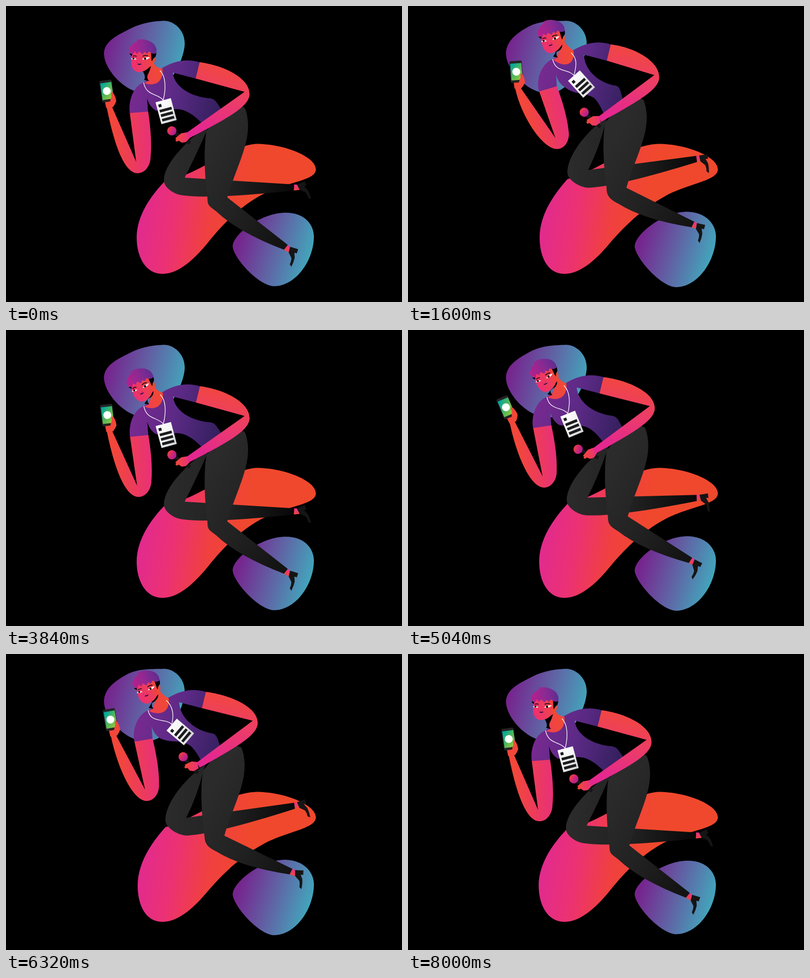
Animation of 800x600 px, one loop 8.04 s. Source, as an HTML page with a canvas:

```html
<!DOCTYPE html>
<html>
<head>
<meta charset="utf-8">
<title>Floating speaker</title>
<style>
html, body { margin: 0; width: 100%; height: 100%; overflow: hidden; background: #000; }
canvas { display: block; }
</style>
</head>
<body>
<canvas id="stage" width="800" height="600"></canvas>
<script>
const ctx = document.getElementById('stage').getContext('2d');
const LOOP = 8040;

// All motion mixes four waves: two eased lifts per loop, the drift that
// separates rising from sinking, and a slower sway and nod over the whole loop.
let phase, lift, drift, sway, nod;
function setTime(ms) {
  phase = ms % LOOP / LOOP * 4 * Math.PI;
  const u = (1 - Math.cos(phase)) / 2;
  lift = u * u * (3 - 2 * u);
  drift = Math.sin(phase) ** 3;
  sway = Math.sin(phase / 2);
  nod = (1 - Math.cos(phase / 2)) / 2;
}
const move = (rest, up, side = 0, slow = 0) => rest + up * lift + side * drift + slow * sway;

const add = (p, x, y) => [p[0] + x, p[1] + y];
const along = (p, v, k) => add(p, v[0] * k, v[1] * k);
function turned(origin, degrees) {
  const c = Math.cos(degrees * Math.PI / 180), s = Math.sin(degrees * Math.PI / 180);
  return (x, y) => add(origin, x * c - y * s, x * s + y * c);
}

function grad(from, to, ...colors) {
  const g = ctx.createLinearGradient(...from, ...to);
  colors.forEach((c, i) => g.addColorStop(i / (colors.length - 1), c));
  return g;
}
function fill(path, color) {
  ctx.fillStyle = color;
  ctx.fill(new Path2D(path));
}
function line(path, color, width) {
  ctx.strokeStyle = color;
  ctx.lineWidth = width;
  ctx.stroke(new Path2D(path));
}
function disc(x, y, r, color) {
  ctx.fillStyle = color;
  ctx.beginPath();
  ctx.arc(x, y, r, 0, 7);
  ctx.fill();
}
function placed(p, degrees, draw) {
  ctx.save();
  ctx.translate(...p);
  ctx.rotate(degrees * Math.PI / 180);
  draw();
  ctx.restore();
}

function blobs() {
  const k = lift, cool = ['#76258f', '#5f65a5', '#41a9bd'];
  fill(`M198 97C198 72 ${225 - 7 * k} ${59 - 3 * k} ${251 - 8 * k} ${46 - 4 * k}S300 31 318 30`
    + 'S361 46 361 76S330 176 285 177S198 127 198 97Z', grad([205, 85], [360, 125], ...cool));
  fill(`M${264 + 2 * k} 470C${264 + 2 * k} 425 292 385 322 ${354 - 3 * k}`
    + `C${385 - 5 * k} ${345 - 9 * k} ${455 - 13 * k} 282 505 279.5C560 279 626 305 626 331`
    + `C626 354 570 ${356 + 3 * k} 522 ${380 + 4 * k}C470 ${406 + 6 * k} 432 ${450 + 3 * k} 410 ${477 + k}`
    + `C386 507 352 543 316 543S${264 + 2 * k} 505 ${264 + 2 * k} 470Z`,
    grad([268, 410], [480, 445], '#e02a90', '#ec3174', '#f04040', '#f0482d'));
  fill(`M458 487C459 462 515 ${420 - 2 * k} 563 ${419 - 2 * k}C605 418 622 445 622 467`
    + `C622 515 586 ${568 + 2 * k} 541 ${568 + 2 * k}C508 ${566 + 2 * k} 458 508 458 487Z`,
    grad([470, 475], [615, 520], ...cool));
}

// Lower leg, sock and shoe hang from the inner knee corner.
function leg(thigh, knee, heel, angle, cap, bulge, color) {
  const len = Math.hypot(heel[0] - knee[0], heel[1] - knee[1]);
  const d = [(heel[0] - knee[0]) / len, (heel[1] - knee[1]) / len], n = [-d[1], d[0]];
  const top = along(heel, d, -6), low = along(top, n, 12.5);
  const calf = along(knee, n, 36), side = add(knee, ...cap);
  const sole = turned(heel, angle)(1, 12);
  fill(`M${top}L${heel}L${sole}L${low}Z`, grad(top, low, '#e8308a', '#f0453c'));
  fill(`${thigh(side)}C${add(side, 0, 16)} ${along(calf, d, -18)} ${calf}`
    + `Q${along(along(calf, d, 60), n, bulge)} ${low}L${top}L${knee}Z`, color);
  placed(heel, angle, () =>
    fill('M0 0L17 -.5 17 8.5 12 8.5 16 18Q17 27 15.5 37.5L11 34Q12 27 10 21L1 12Z', '#151515'));
}

function legs() {
  const hip = (x, y) => [x - 7 * lift, y - 17 * lift];
  const backKnee = [move(361, 3), move(348, -16)];
  leg(side => `M${backKnee}Q${add(backKnee, 23, -46)} ${hip(406, 252)}L${hip(410, 240)}`
      + `C${hip(362, 275)} ${add(side, 0, -32)} ${side}`,
    backKnee, [move(588, 0, 1), move(362, -61.5, 4)], move(-22, 8.5, 12.5, 4.5), [-42, 5], 4,
    grad([330, 330], [590, 340], '#2b2b2b', '#202020', '#060606'));

  const knee = [move(447, -6), move(388, -20)];
  leg(side => `M${knee}C${add(knee, 18, -60)} ${hip(490, 285)} ${hip(489, 240)}`
      + `Q${hip(488, 218)} ${hip(482, 206)}L${hip(452, 196)}L${hip(405, 253)}`
      + `C${hip(399, 290)} ${add(side, -6, -45)} ${side}`,
    knee, [move(574, 10), move(488, -50, 3)], move(19, -11, 17, 3), [-40, 1], 6,
    grad([400, 300], [585, 400], '#2b2b2b', '#222', '#141414'));
}

function phoneArm(arm) {
  const elbow = arm(-5, 101), side = arm(24, 93), low = arm(-2, 124);
  const wrist = add(arm(-60, -12), 0, -4 * lift);
  fill(`M${arm(-18, 1)}L${arm(19, -2)}C${arm(24, 30)} ${arm(27, 65)} ${side}`
    + `C${arm(23, 110)} ${arm(12, 124)} ${low}`
    + `C${arm(-33, 124)} ${add(wrist, 7, 60)} ${add(wrist, -5, 0)}L${add(wrist, 6, 1)}L${elbow}Z`,
    grad(arm(-53, 10), arm(27, 10), '#f2473a', '#e8307a'));
  placed(wrist, -8 - drift * (16 + 42 * Math.cos(phase)), () => {
    fill('M-6 3L-7 -12 14 -14 16 -8Q13 -2 7 3Z', '#f2473a');
    ctx.fillStyle = '#242424';
    ctx.beginPath();
    ctx.roundRect(-12.5, -53, 25, 44, 3);
    ctx.fill();
    ctx.fillStyle = grad([-12, -42], [12, -20], '#00a8a0', '#4fb75c', '#94c83d');
    ctx.fillRect(-11, -48, 22.5, 34);
    disc(0, -31, 8, '#fff');
    fill('M5 -13L8 -19Q7 -27 11 -27Q16 -19 16 -9Q13 -2 8 3L0 3Z', '#f2473a');
  });
}

function torso(left, arm, body) {
  fill(`M${left(278, 155)}C${left(258, 162)} ${arm(-21, -25)} ${arm(-18, 2)}L${arm(19, -1)}`
    + `L${left(285, 187)}C${left(288, 198)} ${left(294, 207)} ${left(303, 212)}`
    + `C${body(325, 214, .8)} ${body(343, 203, .7)} ${body(365, 214, .6)}`
    + `C${body(380, 221, .4)} ${body(388, 230, .2)} ${body(400, 242, 0)}L${body(437, 212, 0)}`
    + `C${body(425, 195, .2)} ${body(423, 188, .4)} ${body(411, 187, .5)}`
    + `C${body(375, 184, .6)} ${body(340, 165, .9)} ${body(337, 135)}`
    + `L${body(383, 147)}L${body(391, 114)}C${body(365, 106)} ${body(340, 111)} ${body(315, 126)}Z`,
    grad(left(250, 150), body(430, 195), '#7b2a91', '#5c2a86', '#35205f'));
}

function micArm(body) {
  const elbow = [move(482, 16.5, -2), move(174, -37, 1, 2)];
  const wrist = [move(365, 21, -2), move(257, -36, 2.5, 1.5)];
  const tip = add(elbow, 10, 4);
  placed(wrist, move(0, 13, -18), () => {
    line('M-23 1L7 21', '#161616', 7);
    disc(-30, -4, 9.3, grad([-38, -9], [-22, 1], '#ee4036', '#d0277a', '#a81e8e'));
    fill('M1 -1L-11 1 -17 6 -23 11 -21 13 -23 15 -20 18 -16 16 -10 20 -2 19 6 11Z',
      grad([-22, 0], [4, 0], '#f2473a', '#e93275'));
  });
  fill(`M${body(391, 114)}C${body(440, 120)} ${add(tip, 0, -32)} ${tip}`
    + `C${add(tip, 0, 23)} ${add(tip, -32, 44)} ${add(wrist, 5, 11)}L${wrist}L${elbow}L${body(383, 147)}Z`,
    grad(body(440, 108), add(wrist, 35, -8), '#f24838', '#ec3d66', '#e4288f'));
}

function head(left, body) {
  const eyes = [move(270, 14, -1.5, 3), move(106, -41, 1, -3) + 12 * nod];
  const tilt = move(0, -6.5, 0, 1.5) - 22 * nod;
  const face = turned(eyes, tilt);

  fill(`M${face(8, 10)}L${face(27, 4)}Q${face(29, 19)} ${body(316, 127)}`
    + `C${body(319, 152)} ${body(302, 165)} ${left(279, 156)}L${left(287, 152)}L${face(14, 26)}Z`,
    grad(left(275, 150), body(318, 140), '#ee3f55', '#f24a2f'));
  fill(`M${face(5, 27)}L${face(23, 16)}Q${face(20, 27)} ${left(286, 140)}Q${left(284, 147)} ${left(289, 152)}`
    + `L${left(279, 150)}Q${left(283, 144)} ${face(7, 27)}Z`, '#000');

  placed(eyes, tilt, () => {
    fill('M22 -2Q32 -5 31 4 29 13 22 14Z', '#f2482c');
    fill('M20 -13L34 -11 32 -3Q27 0 25 6L21 -2Z', '#000');
    fill('M-17 -14L-17 7C-17 22 -9 28 -1 28 11 27 22 20 24 7L23 -14Z',
      grad([-17, 8], [32, 0], '#ee2f72', '#ee3c5c', '#f2482c'));
    fill('M-21 -10L-15 -9 -16 -4Z', '#000');
    line('M-14 -4Q-10 -6 -6 -4M6 -4Q11 -7 17 -5', '#111', 1.7);
    fill('M-18 1Q-12 -3 -6 2Q-12 4 -18 1ZM5 2Q11 -3 21 -2Q14 5 5 2Z', '#fff');
    disc(-12.5, .5, 2.1, '#111');
    disc(11, .8, 2.3, '#111');
    line('M-6 8L-5 8.5M1 8L2 7.8', '#7a1540', 1);
    fill('M-5 12Q-2 10 -.5 11.2 2 10 4 11.5Q0 15 -5 12Z', '#33104f');
    fill('M-23 -9L-21 -15Q-23 -21 -17 -25Q-13 -32 -4 -34L-7 -37Q6 -41 17 -36 31 -31 34 -19L34 -10'
      + 'Q28 -8 23 -11L19 -14 15 -9 10 -13 6 -8 -1 -14 -5 -9 -10 -14 -14 -7 -18 -13Z',
      grad([-22, -18], [34, -24], '#b81f8c', '#8f2992', '#5f2d91'));
  });
}

function badge(left, body) {
  const clip = [move(317.5, 18, -3.5, 1), move(191, -50, 3, -2)];
  line(`M${left(278, 155)}C${left(283, 183)} ${add(clip, -10, -14)} ${clip}`
    + `M${body(311, 131)}C${body(323, 142)} ${add(clip, 6, -23)} ${clip}`, '#fff', 1.3);
  placed(clip, move(-15, -32, 11, 2), () => {
    ctx.fillStyle = grad([-16, 0], [16, 46], '#fff', '#f4f4f4', '#cfd1d4');
    ctx.fillRect(-16, 0, 32, 46);
    ctx.fillStyle = '#1c1c1f';
    ctx.fillRect(-12, 6, 6, 6);
    for (let i = 0; i < 3; i++) ctx.fillRect(-12.5, 17 + 9.5 * i, 25, 5.5);
  });
}

function draw(ms) {
  setTime(ms);
  ctx.fillStyle = '#000';
  ctx.fillRect(0, 0, 800, 600);

  // The trunk bends: weight 1 follows the shoulders, 0 stays near the hips.
  const dx = move(0, 16, -2, 3.5), dy = move(0, -37.5, 1);
  const body = (x, y, w = 1) => [x + dx * w, y + dy * (.4 + .6 * w)];
  const left = (x, y) => [move(x, 12, -1.5, 3), move(y, -45, 1, -4)];
  const arm = turned(left(268, 215), -8.5 * Math.sqrt(lift) - 3.5 * sway);

  blobs();
  legs();
  phoneArm(arm);
  torso(left, arm, body);
  micArm(body);
  head(left, body);
  badge(left, body);
}

const start = performance.now();
function frame() {
  draw(performance.now() - start);
  requestAnimationFrame(frame);
}
frame();
</script>
</body>
</html>
```
